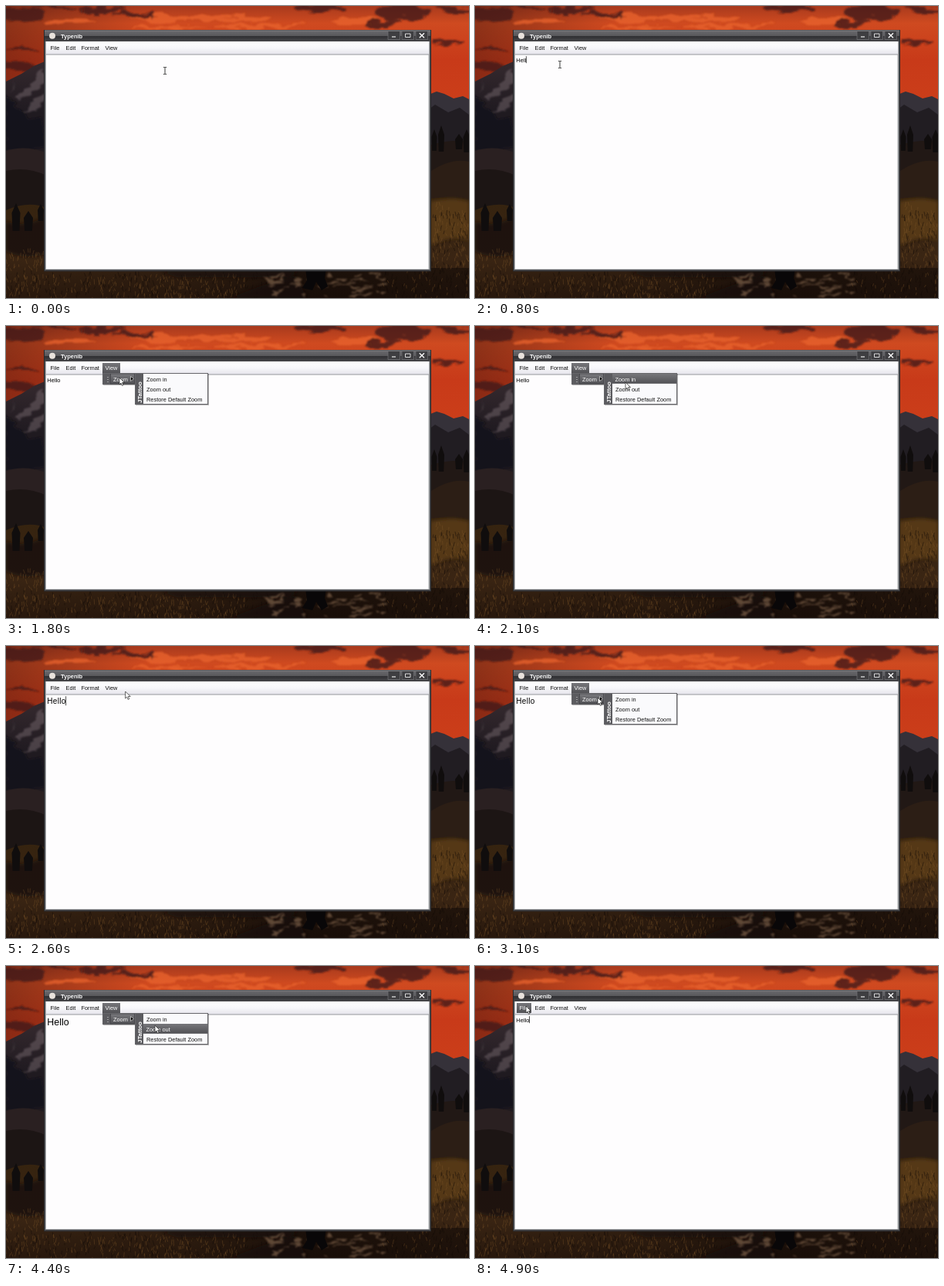
Recreate the animation shown at these times as an HTML page. Size 600 px wide and 379 px high, loop 5 s.

```html
<!DOCTYPE html>
<html lang="en">
<head>
<meta charset="utf-8">
<title>Text editor</title>
<style>
html, body { margin: 0; width: 100%; height: 100%; overflow: hidden; background: #1c120c; }
svg { display: block; width: 100vw; height: 100vh; }
text { font-family: "Liberation Sans", Arial, sans-serif; font-size: 7.4px; white-space: pre; }
</style>
</head>
<body>
<svg viewBox="0 0 600 379" xmlns="http://www.w3.org/2000/svg">
  <defs>
    <linearGradient id="sky" x2="0" y2="1">
      <stop offset="0" stop-color="#a83a1d"/><stop offset=".16" stop-color="#cf4a20"/>
      <stop offset=".5" stop-color="#c83a19"/><stop offset="1" stop-color="#cc3f1a"/>
    </linearGradient>
    <linearGradient id="dusk">
      <stop offset="0" stop-color="#2a0f0c" stop-opacity=".4"/><stop offset=".3" stop-color="#2a0f0c" stop-opacity="0"/>
    </linearGradient>
    <linearGradient id="rock" x2="0" y2="1">
      <stop offset="0" stop-color="#35292e"/><stop offset=".35" stop-color="#1f1a20"/><stop offset="1" stop-color="#201a1d"/>
    </linearGradient>
    <linearGradient id="field" x2="0" y2="1">
      <stop offset="0" stop-color="#35230f"/><stop offset=".6" stop-color="#3a2513"/><stop offset="1" stop-color="#28180d"/>
    </linearGradient>
    <linearGradient id="night">
      <stop offset="0" stop-color="#120a07" stop-opacity="0"/><stop offset=".4" stop-color="#120a07" stop-opacity=".15"/>
      <stop offset=".65" stop-color="#120a07" stop-opacity=".75"/><stop offset="1" stop-color="#120a07" stop-opacity=".55"/>
    </linearGradient>
    <linearGradient id="title" x2="0" y2="1">
      <stop offset="0" stop-color="#8b8b8d"/><stop offset=".12" stop-color="#66666a"/><stop offset=".5" stop-color="#58585b"/>
      <stop offset=".55" stop-color="#303033"/><stop offset="1" stop-color="#47474a"/>
    </linearGradient>
    <linearGradient id="bar" x2="0" y2="1">
      <stop offset="0" stop-color="#fff"/><stop offset=".5" stop-color="#f8f8fb"/><stop offset="1" stop-color="#e4e3ea"/>
    </linearGradient>
    <linearGradient id="lit" x2="0" y2="1">
      <stop offset="0" stop-color="#77777b"/><stop offset="1" stop-color="#515155"/>
    </linearGradient>
    <filter id="soft" x="-20%" y="-20%" width="140%" height="140%"><feGaussianBlur stdDeviation="2"/></filter>
    <filter id="ragged" filterUnits="userSpaceOnUse" x="-20" y="-20" width="640" height="420">
      <feTurbulence type="fractalNoise" baseFrequency=".03 .07" numOctaves="3" seed="4"/>
      <feDisplacementMap in="SourceGraphic" scale="20" xChannelSelector="R" yChannelSelector="G"/>
      <feGaussianBlur stdDeviation=".8"/>
    </filter>
  </defs>

  <rect width="600" height="140" fill="url(#sky)"/>
  <rect width="600" height="140" fill="url(#dusk)"/>
  <g id="clouds" filter="url(#ragged)"/>

  <path d="M0 98L20 88L36 78L50 72L120 130V260H0Z" fill="url(#rock)"/>
  <g filter="url(#ragged)">
    <path d="M49 82L34 100L18 112L12 124L30 116L49 101Z M49 113L34 126L18 138L40 132L49 124Z M14 96L2 112L8 102Z" fill="#75676c" opacity=".5"/>
    <path d="M0 118L18 132L30 150L50 142V188H0Z" fill="#151318" opacity=".75"/>
  </g>
  <path d="M540 118L558 111L568 114L580 120L592 117L600 121V190H540Z" fill="#353139"/>
  <path d="M540 140L556 128L573 138L588 132L600 141V200H540Z" fill="#211d22"/>
  <path d="M0 188Q24 180 52 190V250H0Z" fill="#2a2021"/>
  <path d="M0 214Q28 208 52 220V290H0Z" fill="#1c1514"/>
  <path d="M545 182Q575 172 600 176V270H545Z" fill="#211815"/>
  <path d="M545 218Q576 196 600 202V270H545Z" fill="#2c1e15"/>
  <path d="M0 265Q30 252 52 262L548 250Q580 246 600 252V379H0Z" fill="url(#field)"/>
  <path d="M550 254Q580 247 600 254V304Q580 296 550 310Z" fill="#553819" filter="url(#soft)"/>
  <path d="M0 280Q28 288 52 272V322Q20 330 0 318Z" fill="#17100c" opacity=".75" filter="url(#soft)"/>
  <rect y="340" width="600" height="39" fill="url(#night)"/>
  <path id="grass" fill="none" stroke="#7c5429" stroke-width=".7" opacity=".55"/>
  <path id="shade" fill="none" stroke="#120a06" opacity=".5"/>
  <path id="trees" fill="#100d0d"/>
  <path d="M200 344H380L366 352H220Z M290 379Q340 358 376 350L390 379Z" fill="#120b08" opacity=".6" filter="url(#soft)"/>
  <path id="stones" fill="#7d6048" opacity=".7" filter="url(#ragged)"/>
  <path d="M388 340H415L413 353L417 364L409 369L402 358L397 369L384 366L390 356Z" fill="#090708"/>

  <g id="window">
    <rect x="49" y="31" width="502" height="313.5" fill="#29292c"/>
    <rect x="50" y="32" width="500" height="311.5" fill="#55575a"/>
    <rect x="50" y="31.5" width="500" height="14.5" fill="url(#title)"/>
    <rect x="51" y="46" width="498" height="296" fill="#a4a6a9"/>
    <rect x="52" y="46" width="496" height="17" fill="url(#bar)"/>
    <rect x="52" y="62.5" width="496" height="1" fill="#96979b"/>
    <rect x="52" y="63.5" width="495.5" height="278" fill="#fefdfe"/>
    <circle cx="60" cy="38.8" r="4" fill="#e9e2dc"/>
    <text x="71" y="42" fill="#fff" style="font-weight:bold;font-size:7.5px">Typenib</text>
    <g id="buttons" fill="#3e3e41" stroke="#737377" stroke-width=".7"/>
    <path d="M500 40H505" stroke="#eee" stroke-width="1.2"/>
    <path d="M517.5 36H524V40.5H517.5Z" fill="none" stroke="#eee" stroke-width=".9"/>
    <path d="M535.8 35.2L542 41.2M542 35.2L535.8 41.2" stroke="#fff" stroke-width="1.3"/>
  </g>
  <g id="live"></g>
</svg>
<script>
const LOOP = 5000, STEP = 100;
const $ = id => document.getElementById(id);

let seed = 7;
const rand = (a, b) => {
  seed = (seed * 16807) % 2147483647;
  return a + (b - a) * seed / 2147483647;
};

function drawScenery() {
  const puff = (fill, opacity) => ([x, y, w, h]) =>
    `<ellipse cx="${x}" cy="${y}" rx="${w}" ry="${h}" fill="${fill}" opacity="${opacity}"/>`;
  const glow = [[250, 16, 90, 4], [330, 26, 60, 3], [85, 20, 36, 3], [450, 18, 30, 4], [210, 28, 50, 2]];
  const dark = [
    [15, 12, 34, 9], [125, 5, 32, 4], [165, 12, 28, 3], [60, 2, 30, 2], [405, 3, 34, 5],
    [515, 9, 36, 10], [490, 22, 24, 4], [580, 3, 24, 4], [572, 47, 20, 3],
    [22, 57, 22, 3], [18, 77, 24, 6]
  ];
  $('clouds').innerHTML = glow.map(puff('#e8632b', .75)).join('') + dark.map(puff('#42191a', .8)).join('');

  const blades = (n, x0, x1, y0, y1) => {
    let d = '';
    for (let i = 0; i < n; i++)
      d += `M${rand(x0, x1).toFixed(1)} ${rand(y0, y1).toFixed(1)}l${rand(-2, 2).toFixed(1)} ${rand(-7, -3).toFixed(1)}`;
    return d;
  };
  $('grass').setAttribute('d', blades(260, 0, 310, 352, 382) + blades(40, 490, 600, 345, 382) +
    blades(40, 0, 49, 320, 345) + blades(110, 552, 600, 258, 345));
  $('shade').setAttribute('d', blades(190, 0, 350, 348, 384) + blades(80, 480, 600, 348, 384) +
    blades(60, 552, 600, 270, 350));

  let d = '';
  for (let i = 0; i < 45; i++) {
    const y = rand(348, 377), w = rand(4, 16);
    d += `M${rand(335, 490).toFixed(1)} ${y.toFixed(1)}l${w.toFixed(1)} -1l${(w / 3).toFixed(1)} 2l${(-w).toFixed(1)} 1Z`;
  }
  $('stones').setAttribute('d', d);

  const tree = (x, y, w, h) => `M${x} ${y}l${w / 2} ${h * .35}l${-w * .1} ${h * .65}h${-w * .8}l${-w * .1} ${-h * .65}Z`;
  $('trees').setAttribute('d', tree(13, 256, 11, 36) + tree(29, 266, 12, 26) + tree(45, 257, 8, 22) +
    tree(555, 160, 7, 28) + tree(564, 155, 8, 34) + tree(587, 166, 10, 20) + tree(597, 160, 9, 30));

  $('buttons').innerHTML = [495, 513, 531].map(x => `<path d="M${x} 33V43.5H${x + 15.5}V33"/>`).join('');
}

// Pointer path: time, x, y
const PATH = [
  [0, 206, 84], [300, 140, 78], [500, 110, 76], [900, 110, 76], [1100, 66, 55], [1200, 84, 55],
  [1400, 112, 55], [1600, 135, 55], [1800, 147, 67], [2000, 185, 68], [2100, 195, 73], [2200, 195, 70],
  [2400, 190, 69], [2700, 137, 54], [2900, 147, 67], [3100, 159, 67], [3300, 190, 69], [3500, 192, 69],
  [3800, 136, 46], [4000, 137, 55], [4200, 155, 68], [4300, 183, 69], [4400, 193, 77], [4500, 196, 92],
  [4600, 180, 88], [4900, 66, 52], [5000, 66, 52]
];
// Open menus: start, end, name, start of submenu
const MENUS = [
  [1300, 1600, 'Format'], [1600, 2300, 'View', 1800],
  [2700, 3400, 'View', 2900], [4000, 4600, 'View', 4200]
];
// Zoom levels: start, font size, baseline, letter spacing
const ZOOM = [[0, 7.5, 72.5, 0], [2300, 10, 75, .3], [3400, 12.4, 77, 0], [4600, 7.5, 72.5, 0]];
// Menu headers: name, left, right, text position
const HEADERS = [['File', 54, 73, 57.5], ['Edit', 73, 94, 77.5], ['Format', 94, 125, 97.5], ['View', 125, 148, 128.5]];

function pointer(t) {
  const i = PATH.findIndex(p => p[0] > t);
  const [t0, x0, y0] = PATH[i - 1], [t1, x1, y1] = PATH[i];
  const k = (t - t0) / (t1 - t0);
  return [x0 + (x1 - x0) * k, y0 + (y1 - y0) * k];
}

const rect = (x, y, w, h, fill, more = '') => `<rect x="${x}" y="${y}" width="${w}" height="${h}" fill="${fill}" ${more}/>`;
const label = (x, y, s, fill = '#111', style = '') => `<text x="${x}" y="${y}" fill="${fill}" style="${style}">${s}</text>`;
const arrowTip = (x, y, edge = 'none') => `<path d="M${x} ${y - 3}l4 3l-4 3Z" fill="#000" stroke="${edge}" stroke-width=".7"/>`;

function popup(x, y, w, h) {
  return rect(x + 1, y + 1, w, h, '#000', 'opacity=".3"') +
    rect(x + .5, y + .5, w - 1, h - 1, '#fafafc', 'stroke="#66666a"') +
    rect(x + 1, y + 1, 10, h - 2, '#5b5b5f');
}
const brand = (x, y) =>
  `<text transform="translate(${x} ${y}) rotate(-90)" fill="#fff" style="font-weight:bold;font-size:7.9px">JTattoo</text>`;

function formatMenu() {
  return popup(94, 61, 78, 42) + brand(102.5, 101) +
    rect(109, 64, 9.5, 9.5, '#fff', 'stroke="#55555a"') +
    ['Word Wrap', 'Align Text', 'Font'].map((s, i) => label(122, 72 + 13 * i, s)).join('') +
    arrowTip(163.5, 82);
}

function viewMenu(sub, x, y) {
  const onZoom = sub || y > 61;
  let s = popup(125, 61, 42, 15) +
    [66, 69, 72].map(v => rect(131.5, v, 1, 1, '#ddd')).join('');
  if (onZoom) s += rect(135.5, 62.5, 31, 12.5, 'url(#lit)', 'stroke="#3f3f43" stroke-width=".7"');
  s += label(139, 71.8, 'Zoom', onZoom ? '#fff' : '#111') + arrowTip(161.5, 68.5, onZoom ? '#ddd' : 'none');
  if (!sub) return s;
  s += popup(167, 61, 95, 41) + brand(175.5, 100);
  ['Zoom in', 'Zoom out', 'Restore Default Zoom'].forEach((name, i) => {
    const top = 62 + 13 * i, hot = x > 178 && y >= top && y < top + 13;
    if (hot) s += rect(178, top, 83, 12.8, 'url(#lit)');
    s += label(hot ? 181.5 : 182, top + 9.5, name, hot ? '#fff' : '#111');
  });
  return s;
}

function cursor(x, y, beam) {
  if (beam) return `<path d="M${x - 2} ${y - 4.5}h1.5l.5 .5l.5 -.5h1.5M${x} ${y - 4}v8M${x - 2} ${y + 4.5}h1.5l.5 -.5l.5 .5h1.5" fill="none" stroke="#222" stroke-width=".9"/>`;
  return `<path d="M${x} ${y}v9l2 -1.9l1.5 3.3l1.6 -.7l-1.5 -3.2h2.9Z" fill="#fff" stroke="#222" stroke-width=".7"/>`;
}

function draw(time) {
  const t = Math.floor(time / STEP) * STEP;
  const [x, y] = pointer(t);
  const menu = MENUS.find(m => t >= m[0] && t < m[1]);
  const [, size, base, gap] = ZOOM.filter(z => z[0] <= t).pop();
  const typed = 'Hello'.slice(0, Math.max(0, Math.floor((t - 400) / STEP)));
  let s = '';

  for (const [name, x0, x1, tx] of HEADERS) {
    const hot = menu ? menu[2] === name : y >= 48 && y < 61 && x >= x0 && x < x1;
    if (hot) s += rect(x0, 48, x1 - x0, 13, 'url(#lit)');
    s += label(tx, 57, name, hot ? '#fff' : '#111');
  }
  s += label(53.3, base, typed, '#000', `font-size:${size}px;letter-spacing:${gap}px`);
  if (!menu && t >= 400) {
    const advance = { H: .722, e: .556, l: .222, o: .556 };
    const end = [...typed].reduce((w, c) => w + advance[c] * size + gap, 53.3);
    s += rect(end - .3, base - size * .98, .8, size * 1.2, '#222');
  }
  if (menu) s += menu[2] === 'Format' ? formatMenu() : viewMenu(t >= menu[3], x, y);
  s += cursor(x, y, !menu && y > 63);
  $('live').innerHTML = s;
}

drawScenery();
const start = performance.now();
let last = -1;
function tick() {
  const time = (performance.now() - start) % LOOP;
  const slot = Math.floor(time / STEP);
  if (slot !== last) draw(time);
  last = slot;
  requestAnimationFrame(tick);
}
tick();
</script>
</body>
</html>
```
